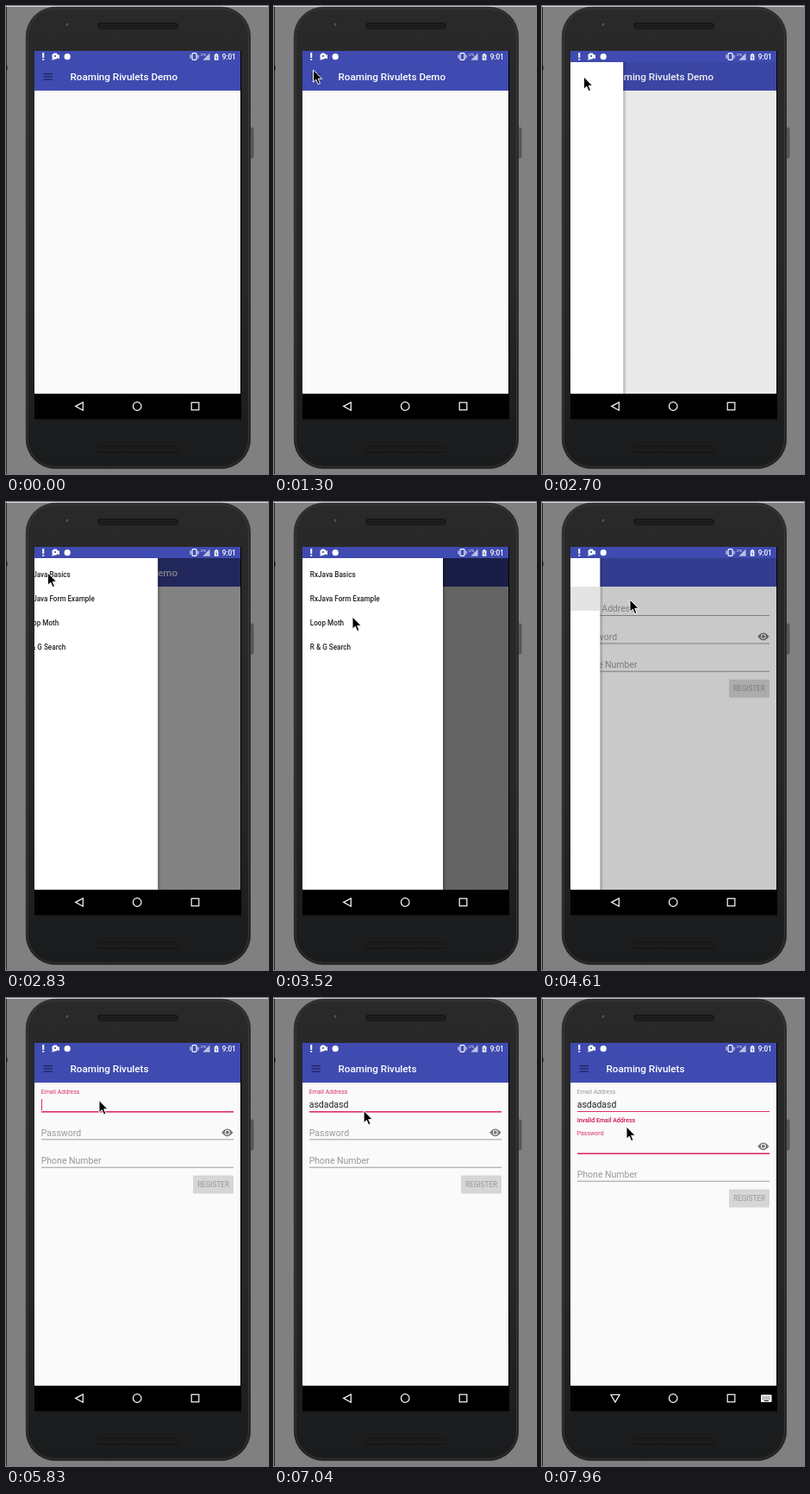
An HTML page that plays this animation: 304 by 542 pixels, repeating every 8 s.

```html
<!DOCTYPE html>
<html lang="en">
<head>
<meta charset="utf-8">
<title>Phone form demo</title>
<style>
html, body { margin: 0; width: 100%; height: 100%; overflow: hidden; background: #808080; }
svg { display: block; width: 304px; height: 542px; font-family: Roboto, sans-serif; }
.med { font-weight: 500; }
.hint { font-size: 10.5px; fill: #989898; }
</style>
</head>
<body>
<svg viewBox="0 0 304 542">
  <defs>
    <linearGradient id="body" x2="0" y2="1">
      <stop offset="0" stop-color="#29292a"/><stop offset=".6" stop-color="#272728"/>
      <stop offset=".88" stop-color="#1d1e1f"/><stop offset="1" stop-color="#1a1b1c"/>
    </linearGradient>
    <linearGradient id="shade" x2="1" y2="0">
      <stop offset="0" stop-opacity=".25"/><stop offset="1" stop-opacity="0"/>
    </linearGradient>
    <pattern id="mesh" width="3" height="3" patternUnits="userSpaceOnUse">
      <rect width="3" height="3" fill="#191919"/><circle cx="1" cy="1" r=".7" fill="#2b2b2b"/>
    </pattern>
    <clipPath id="app"><rect x="33" y="65" width="239" height="384"/></clipPath>
  </defs>

  <rect width="304" height="542" fill="#808080"/>
  <rect width="304" height="1" fill="#dcdcdc"/>
  <rect y="1" width="1" height="541" fill="#222"/>
  <rect y="69" width="1.5" height="5" fill="#111"/>

  <!-- phone -->
  <rect x="283" y="141" width="4" height="35" rx="1.5" fill="#5a5a5a" stroke="#444" stroke-width=".6"/>
  <rect x="23.3" y="1.3" width="260.2" height="534.4" rx="34" fill="url(#body)" stroke="#2a2a2a" stroke-width=".8"/>
  <rect x="25.3" y="3.3" width="256.2" height="530.4" rx="32" fill="none" stroke="#404041" stroke-width=".8"/>
  <circle cx="71" cy="21.5" r="4" fill="#202021" stroke="#333334" stroke-width=".7"/>
  <circle cx="71" cy="21.5" r="1.9" fill="#4a4a4d"/>
  <rect x="106.5" y="19.5" width="93" height="7" rx="3.5" fill="url(#mesh)" stroke="#151515"/>
  <rect x="106.5" y="510" width="93" height="7" rx="3.5" fill="url(#mesh)" stroke="#121212"/>

  <!-- screen -->
  <rect x="33" y="52" width="240" height="426.5"/>
  <rect x="33" y="52" width="239" height="397" fill="#fafafa"/>
  <rect x="33" y="52" width="239" height="46" fill="#3f4bb0"/>

  <g clip-path="url(#app)">
    <g id="burger" fill="#1f2458">
      <rect x="43.5" y="78" width="10.5" height="1.2"/>
      <rect x="43.5" y="81.3" width="10.5" height="1.2"/>
      <rect x="43.5" y="84.6" width="10.5" height="1.2"/>
    </g>
    <text id="title" class="med" x="74.5" y="86.3" font-size="11.67" fill="#fff"></text>

    <g id="form">
      <text id="mailHint" class="hint" x="40.7">Email Address</text>
      <text id="mail" x="40.7" y="127" font-size="10.5" fill="#222"></text>
      <rect id="mailLine" x="41" width="223"/>
      <rect id="caret" y="117" width="1" height="13" fill="#d92c6c"/>
      <text id="error" class="med" x="40.7" y="144.3" font-size="7" fill="#cc1048">Invalid Email Address</text>
      <g id="rest">
        <text id="passHint" class="hint" x="40.7">Password</text>
        <rect id="passLine" x="41" width="223"/>
        <path d="M250.2 155.8Q256.8 147 263.4 155.8Q256.8 164.6 250.2 155.8Z" fill="#757575"/>
        <circle cx="256.8" cy="155.8" r="2.5" fill="#757575" stroke="#fafafa" stroke-width="1.1"/>
        <text class="hint" x="40.7" y="192">Phone Number</text>
        <rect x="41" y="195.7" width="223" height="1" fill="#9b9b9b"/>
        <rect x="217" y="205.5" width="47" height="21" rx="1" fill="#d6d6d6"/>
        <text class="med" x="240.5" y="219" font-size="8.17" text-anchor="middle" fill="#a4a4a4">REGISTER</text>
      </g>
    </g>

    <rect id="scrim" x="33" y="65" width="239" height="384"/>
    <g id="drawer">
      <rect x="196" y="65" width="4" height="384" fill="url(#shade)"/>
      <rect x="33" y="65" width="163" height="384" fill="#fff"/>
      <rect id="press" x="33" y="98" width="163" height="28" fill="#e4e4e4"/>
      <g id="menu" class="med" font-size="8.17" fill="#222"></g>
    </g>
  </g>

  <!-- status bar -->
  <g fill="#fff">
    <rect x="42.2" y="54" width="2" height="6" rx=".6"/><circle cx="43.2" cy="62" r="1.1"/>
    <circle cx="57" cy="58" r="3.6"/><circle cx="57" cy="58" r="1.1" fill="#3f4bb0"/>
    <path d="M53 62.8L54.2 59.5L57 61.6ZM60 57.5L62 56V61.5L60 60Z"/>
    <circle cx="71.2" cy="58.7" r="3.6"/>
    <rect x="216" y="54.7" width="5" height="7.6" rx="1" fill="none" stroke="#fff" stroke-width="1.2"/>
    <path d="M214 56.5V60.5M223 56.5V60.5" stroke="#fff"/>
    <path d="M236.5 54.5V62.7H228.3Z" opacity=".65"/>
    <text x="226" y="57.7" font-size="4">LTE</text>
    <path d="M241.8 56.2H243V55H245.2V56.2H246.4V62.8H241.8Z"/>
    <path d="M244.6 57L243.3 59.6H245L244 62" fill="none" stroke="#3f4bb0" stroke-width=".7"/>
    <text class="med" x="250.7" y="62" font-size="8.17">9:01</text>
  </g>

  <!-- navigation bar -->
  <g fill="none" stroke="#fff" stroke-width="1.2">
    <path id="backKey"/>
    <circle cx="152.2" cy="463.5" r="4.8"/>
    <rect x="215.2" y="459.2" width="8.6" height="8.6"/>
  </g>
  <g id="keys">
    <rect x="254" y="459.5" width="12.5" height="8.5" rx="1" fill="#fff"/>
    <path d="M255.5 462H265M255.5 464.2H265" stroke="#000" stroke-dasharray="1.1 .9"/>
    <path d="M257.5 466.4H263" stroke="#000"/>
  </g>

  <path id="arrow" d="M0 0V14.2L3.3 11.2L5.6 16.6L8 15.6L5.7 10.3H10.2Z" fill="#000" stroke="#fff" stroke-width="1"/>
</svg>
<script>
const LOOP = 8000;
const OPEN = 2655, CLOSE = 4474, SLIDE = 512, LAG = 34;
const SWAP = 4445, MAIL = 5120, ERROR = 7050, PASS = 7770;
const TYPED = 'asdadasd', TYPE_START = 6250, TYPE_STEP = 85;
const PINK = '#dc2f6e', GREY = '#9b9b9b', HINT = '#989898';
const NAME = 'Roaming Rivulets';
const MENU = ['RxJava Basics', 'RxJava Form Example', 'Loop Moth', 'R & G Search'];

// pointer stops: time, x, y
const STOPS = [
  [880, 306, -16], [1260, 45.5, 74], [1700, 45.5, 74], [1870, 47, 80], [2090, 47, 80],
  [2500, 48.5, 82], [2900, 48.5, 82], [3480, 91, 133], [3720, 91, 133],
  [4250, 101, 112.5], [4620, 102, 113], [5080, 108, 118.5], [6700, 108, 118.5],
  [7500, 98, 149]
];

const el = {};
document.querySelectorAll('svg [id]').forEach(n => el[n.id] = n);
MENU.forEach((label, i) => {
  const text = document.createElementNS('http://www.w3.org/2000/svg', 'text');
  text.setAttribute('x', 41.8);
  text.setAttribute('y', 87 + 28 * i);
  text.textContent = label;
  el.menu.append(text);
});

const clamp = v => Math.min(1, Math.max(0, v));
const ease = p => p * p * (3 - 2 * p);
const quint = p => 1 - (1 - p) ** 5;
const set = (node, attrs) => { for (const k in attrs) node.setAttribute(k, attrs[k]); };
const show = (node, on) => node.setAttribute('visibility', on ? 'visible' : 'hidden');

const drawerAt = t => quint(clamp((t - OPEN) / SLIDE)) - quint(clamp((t - CLOSE) / SLIDE));

function pointerAt(t) {
  const i = STOPS.findIndex(s => s[0] > t);
  if (i === 0) return STOPS[0].slice(1);
  if (i < 0) return STOPS[STOPS.length - 1].slice(1);
  const [t0, x0, y0] = STOPS[i - 1], [t1, x1, y1] = STOPS[i];
  const p = ease((t - t0) / (t1 - t0));
  return [x0 + (x1 - x0) * p, y0 + (y1 - y0) * p];
}

function floatHint(node, top, since, focused) {
  const p = ease(clamp(since / 180));
  set(node, { y: top + 16.5 * (1 - p) });
  node.style.fontSize = 10.5 - 3.5 * p + 'px';
  node.style.fill = focused ? PINK : HINT;
}

function underline(node, y, focused, fill) {
  set(node, { y, height: focused ? 1.6 : 1, fill });
}

function draw(t) {
  const mailFocus = t >= MAIL && t < PASS, passFocus = t >= PASS;
  const open = drawerAt(t), closed = t > CLOSE + SLIDE;

  el.title.textContent = t < OPEN + SLIDE ? NAME + ' Demo' : closed ? NAME : '';
  show(el.burger, open < .9);
  set(el.drawer, { transform: `translate(${-163 * (1 - open)} 0)` });
  show(el.drawer, open > .001);
  set(el.scrim, { opacity: .6 * drawerAt(t - LAG) });
  set(el.press, { opacity: clamp((t - 4370) / 80) });

  show(el.form, t >= SWAP);
  floatHint(el.mailHint, 110.5, t - MAIL, mailFocus);
  underline(el.mailLine, 131, mailFocus, t >= MAIL ? PINK : GREY);
  const count = Math.min(TYPED.length, Math.max(0, Math.floor((t - TYPE_START) / TYPE_STEP) + 1));
  el.mail.textContent = TYPED.slice(0, count);
  const typing = t >= TYPE_START && t < TYPE_START + TYPE_STEP * TYPED.length;
  const blink = (t - 5500 + LOOP) % 1000 < 500;
  set(el.caret, { x: 41 + (count ? el.mail.getComputedTextLength() : 0) });
  show(el.caret, mailFocus && (typing || blink));

  show(el.error, t >= ERROR);
  set(el.rest, { transform: `translate(0 ${t >= ERROR ? 16 : 0})` });
  floatHint(el.passHint, 143, t - PASS, passFocus);
  underline(el.passLine, 163.4, passFocus, passFocus ? PINK : GREY);

  const keyboard = t >= PASS + 80;
  show(el.keys, keyboard);
  set(el.backKey, { d: keyboard ? 'M80 459.5H90L85 468Z' : 'M89.3 459V468.3L80.7 463.6Z' });

  const [x, y] = pointerAt(t);
  set(el.arrow, { transform: `translate(${x} ${y})` });
}

const start = performance.now();
function tick() {
  draw((performance.now() - start) % LOOP);
  requestAnimationFrame(tick);
}
tick();
</script>
</body>
</html>
```
